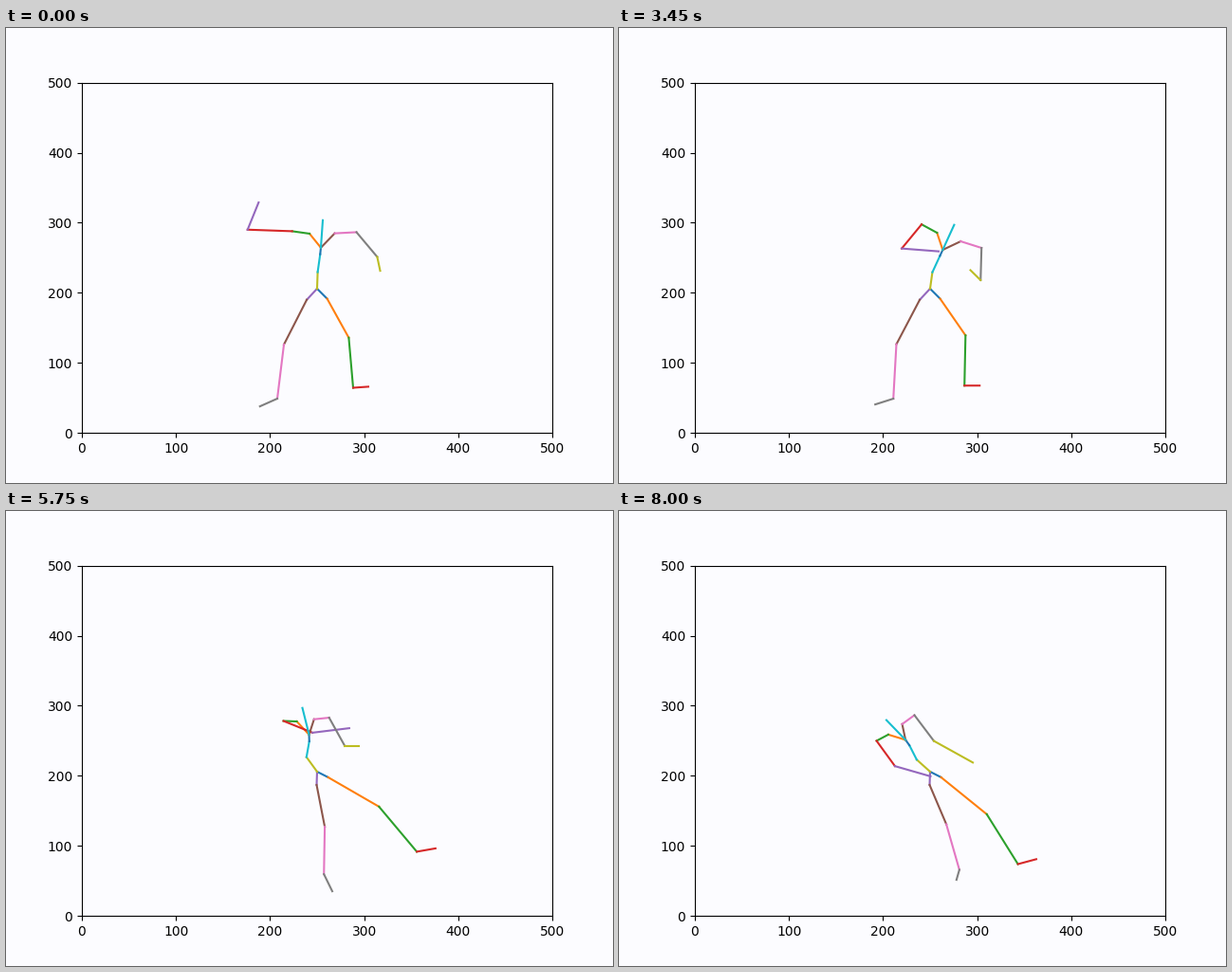
Recreate the animation shown at these times as a matplotlib script. Size 640 by 480 pixels, loop 8.05 s.

```python
import numpy as np
import matplotlib.pyplot as plt
from matplotlib.animation import FuncAnimation

FRAMES, STEP = 161, 50
PAPER = "#fcfcff"
ROOT = np.array([328, 275])  # pelvis, in stage pixels

# Bone angles in degrees clockwise from straight up, one per key pose.
TIMES = np.array([0, 1600, 2500, 4250, 5150, 5750, 6650, 8000])
TRUNK = [  # spine, chest, head
    [2, 7, -5, 18, -15, -36, -49, -48],
    [8, 12, 24, 25, 18, 10, 0, -27],
    [4, 14, 16, 30, 5, -14, -38, -44],
]
RIGHT_LEG = [  # thigh, shin, foot
    [151, 148, 138, 151, 131, 120, 121, 129],
    [175, 178, 175, 186, 148, 140, 153, 148],
    [86, 86, 86, 93, 82, 80, 83, 75],
]
LEFT_LEG = [
    [207, 208, 202, 215, 221, 169, 133, 157],
    [187, 188, 181, 188, 227, 181, 139, 164],
    [246, 248, 236, 265, 253, 154, 47, 196],
]
LEFT_ARM = [  # upper arm, forearm
    [-88, -109, -146, -129, -60, 112, 190, 144],
    [22, 83, 82, 104, 95, 83, 134, 106],
]
RIGHT_ARM = [
    [140, 167, 183, 179, 170, 151, 111, 143],
    [168, 321, 324, 295, 190, 90, 101, 119],
]


def smooth(rows, t):
    """Monotone cubic interpolation of each row at time t."""
    v = np.array(rows, float)
    gap = np.diff(TIMES)
    slope = np.diff(v) / gap
    a, b = slope[:, :-1], slope[:, 1:]
    same = a * b > 0
    m = np.zeros_like(v)
    m[:, 1:-1] = np.where(same, 2 * a * b / np.where(same, a + b, 1), 0)
    m[:, 0], m[:, -1] = slope[:, 0] / 2, slope[:, -1] / 2
    i = min(np.searchsorted(TIMES, t, side="right") - 1, len(gap) - 1)
    u = (t - TIMES[i]) / gap[i]
    s = u * u * (3 - 2 * u)
    return (v[:, i] * (1 - s) + v[:, i + 1] * s
            + gap[i] * u * (1 - u) * (m[:, i] * (1 - u) - m[:, i + 1] * u))


def limb(start, angles, lengths):
    """Joints of a chain of bones, beginning at start."""
    a = np.radians(angles)
    steps = np.column_stack([np.sin(a), -np.cos(a)]) * np.reshape(lengths, (-1, 1))
    return np.vstack([start, start + np.cumsum(steps, axis=0)])


def skeleton(t):
    def ease(a, b, t0=4250, t1=5750):
        u = np.clip((t - t0) / (t1 - t0), 0, 1)
        return a + (b - a) * u * u * (3 - 2 * u)

    spine, chest, head = smooth(TRUNK, t)
    trunk = limb(ROOT, [spine, chest, (chest + head) / 2],
                 [ease(17.5, 19), ease(19, 17), 7])
    neck = trunk[-1]

    # The body turns sideways, so hips and shoulders narrow.
    right_leg = limb(ROOT, [ease(135, 117), *smooth(RIGHT_LEG, t)],
                     [ease(15, 13), ease(47, 62), ease(53, 62), ease(16, 20)])
    left_leg = limb(ROOT, [ease(223, 182), *smooth(LEFT_LEG, t)],
                    [ease(16, 14), ease(53, 45), ease(57.5, 50),
                     ease(20, 11, 5750, 6650)])
    # Collarbones and shoulders tilt along with the head.
    left_arm = limb(neck, [head + ease(-43, -29), head + ease(-86, -74),
                           *smooth(LEFT_ARM, t)],
                    [19, ease(18.5, 14), ease(47, 33, 0, 1600),
                     ease(31, 39, 0, 1600)])
    right_arm = limb(neck, [head + ease(40, 32), head + ease(83, 98),
                            *smooth(RIGHT_ARM, t)],
                     [ease(21, 17), ease(23, 16), 34, ease(15, 47, 5750, 6650)])
    return [right_leg, left_leg, trunk, left_arm, right_arm,
            limb(neck, [head], [29])]


def to_data(points):
    return (points - [80, 427.2]) / [0.992, -0.7392]


fig, ax = plt.subplots(figsize=(6.4, 4.8), dpi=100, facecolor=PAPER)
ax.set(xlim=(0, 500), ylim=(0, 500), facecolor=PAPER)
lines = [ax.plot([], [])[0] for _ in range(20)]


def draw(n):
    bones = [joints[i:i + 2] for joints in map(to_data, skeleton(n * STEP))
             for i in range(len(joints) - 1)]
    for line, bone in zip(lines, bones):
        line.set_data(*bone.T)
    return lines


anim = FuncAnimation(fig, draw, frames=FRAMES, interval=STEP, repeat=True,
                     repeat_delay=0)
plt.show()
```
